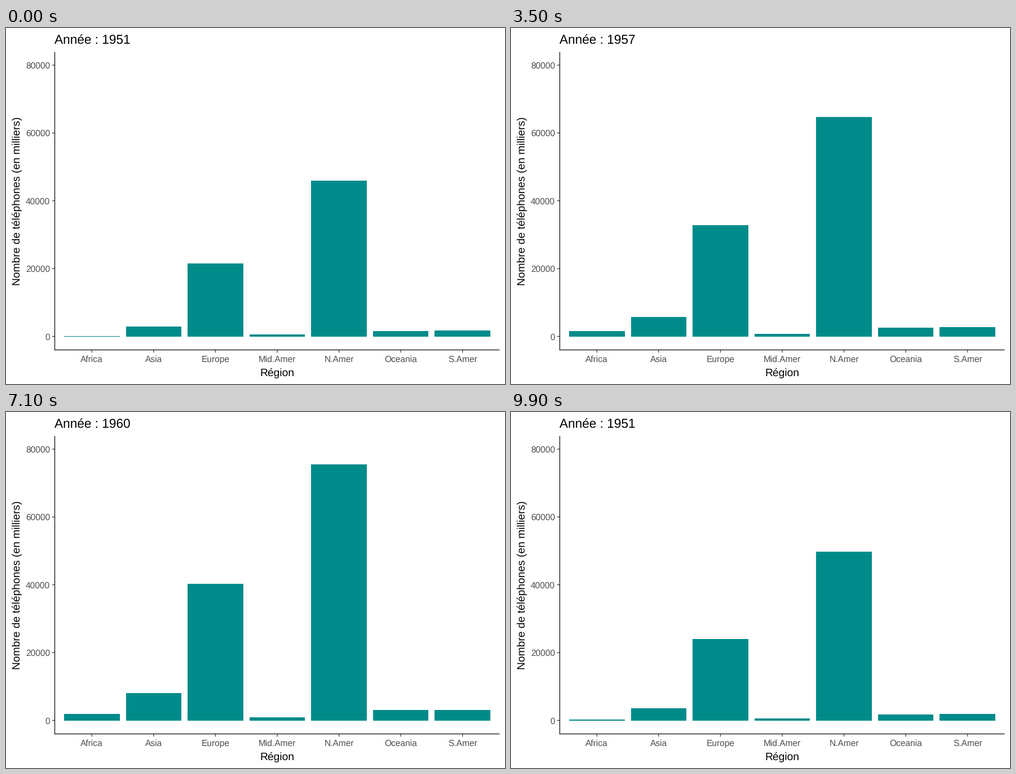
Recreate the animation shown at these times as a matplotlib script. Size 885 px wide and 632 px high, loop 10000 ms.

```python
import matplotlib.pyplot as plt
import numpy as np
from matplotlib.animation import FuncAnimation
from matplotlib.patches import Rectangle

W, H = 885, 632
LEFT, RIGHT, TOP, BOTTOM = 86.5, 875.5, 42.8, 571.5
FRAMES, INTERVAL = 100, 100
HOLD = 5

# thousands of telephones at the key years, linear in between
KEY_YEARS = [1951, 1956, 1961]
REGIONS = {
    "Africa": (89, 1411, 2005),
    "Asia": (2876, 4708, 9053),
    "Europe": (21574, 29990, 43173),
    "Mid.Amer": (555, 733, 1076),
    "N.Amer": (45939, 60423, 79831),
    "Oceania": (1646, 2366, 3224),
    "S.Amer": (1815, 2568, 3338),
}
YEARS = [1951, *range(1956, 1962)]

STEP = (RIGHT - LEFT) / 7.2
PEAK = max(map(max, REGIONS.values()))
SCALE = (BOTTOM - TOP) / 1.1 / PEAK
ZERO = BOTTOM - 0.05 * PEAK * SCALE + 0.1

plt.rcParams["font.family"] = "Liberation Sans"
plt.rcParams["text.hinting"] = "none"
fig = plt.figure(figsize=(W / 72, H / 72), dpi=72, facecolor="white")
ax = fig.add_axes([0, 0, 1, 1])
ax.set_xlim(0, W)
ax.set_ylim(H, 0)
ax.axis("off")


def label(x, y, text, size, color="black", ha="center", **kw):
    return ax.text(x, y, text, size=size, color=color, ha=ha, va="baseline", **kw)


def line(xs, ys, color="black"):
    ax.plot(xs, ys, color=color, lw=1.2, solid_capstyle="butt", snap=False)


bars = []
for i, region in enumerate(REGIONS):
    x = LEFT + STEP * (i + 0.6)
    bar = Rectangle((x - 0.45 * STEP, ZERO), 0.9 * STEP, 0,
                    fc="#008B8B", lw=0, snap=True)
    bars.append(ax.add_patch(bar))
    line([x, x], [BOTTOM, BOTTOM + 4.8], "#333333")
    label(x, 592.5, region, 15.5, "#4D4D4D")

for value in range(0, 80001, 20000):
    y = ZERO - value * SCALE
    line([LEFT - 4.8, LEFT], [y, y], "#333333")
    label(78, y + 6, str(value), 15.5, "#4D4D4D", "right")

line([LEFT, LEFT], [TOP, BOTTOM + 0.6])
line([LEFT - 0.6, RIGHT], [BOTTOM, BOTTOM])
label((LEFT + RIGHT) / 2, 618, "Région", 19.2)
label(25.5, (TOP + BOTTOM) / 2 + 0.5, "Nombre de téléphones (en milliers)", 19.2,
      rotation=90, rotation_mode="anchor")
title = label(86.2, 28.5, "", 22.6, ha="left")


def depart(i):
    """Last still frame of the i-th year; later cycles are one frame shorter."""
    return min(4 + 15 * i, 7 + 14 * i)


def update(frame):
    i = sum(frame > depart(j + 1) - HOLD for j in range(len(YEARS)))
    steps = depart(i + 1) - HOLD - depart(i)
    k = max(0, frame - depart(i))
    a, b = YEARS[i], YEARS[(i + 1) % len(YEARS)]
    title.set_text(f"Année : {a if k <= (steps + 1) // 2 else b}")
    for bar, keys in zip(bars, REGIONS.values()):
        u, v = np.interp([a, b], KEY_YEARS, keys)
        bar.set_height(-(u + (v - u) * k / steps) * SCALE)
    return [title, *bars]


anim = FuncAnimation(fig, update, frames=FRAMES, interval=INTERVAL,
                     repeat=True, repeat_delay=0, blit=False)
plt.show()
```
